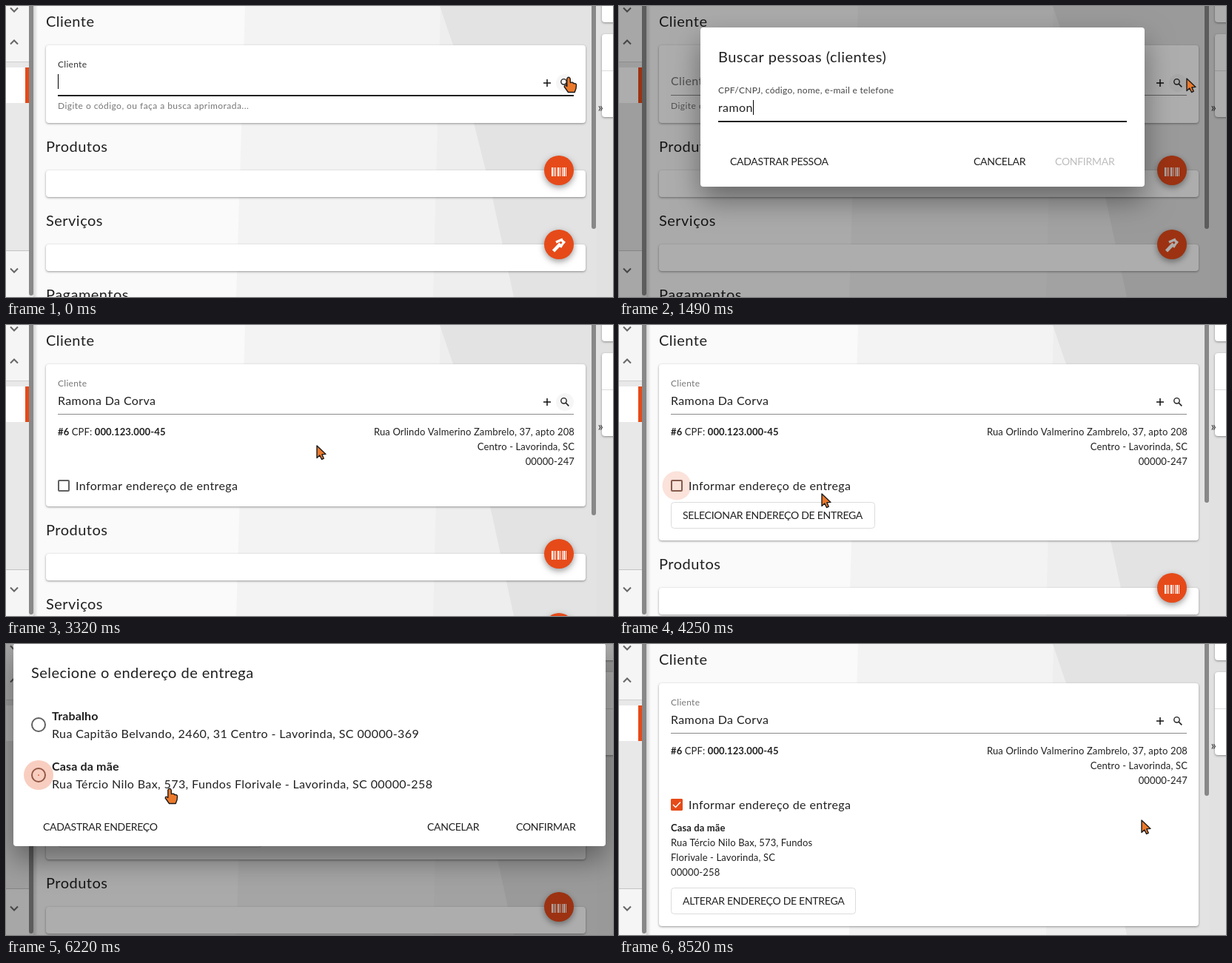
An HTML page with a canvas for the animation above (9860 ms loop, 820 by 393 pixels).

```html
<!DOCTYPE html>
<html lang="pt-BR">
<head>
<meta charset="utf-8">
<title>Endereço de entrega</title>
<style>
  html, body { margin: 0; width: 100%; height: 100%; overflow: hidden; background: #fafafa; }
  canvas { display: block; }
</style>
</head>
<body>
<canvas id="stage" width="820" height="393"></canvas>
<script>
const ctx = document.getElementById('stage').getContext('2d');
const LOOP = 9860;
const INK = '#212121', GREY = '#777', ORANGE = '#e64a19';
const CLIENT = 'Ramona Da Corva', TYPED = 'ramon';
const CITY = 'Lavorinda, SC';
const CENTER = [410, 136.5];

// Moments of the story, in ms
const SEARCH = { open: 240, close: 2940 };
const ADDRESS = { open: 4330, close: 8240 };
const INFO = 3300, CHECK = 4150, DELIVERED = 8280;
const KEYS = [800, 1040, 1140, 1300, 1490];
const LIST = { open: 1900, pick: 2740 };
const PICKS = [[6200, 1], [7240, 0], [7650, 1]];

const PATH = [
  [0, 760, 96], [300, 760, 96], [420, 767, 98], [1720, 767, 98], [2400, 420, 163],
  [3620, 420, 163], [4000, 284, 214], [4250, 274, 228], [4650, 274, 228],
  [4900, 70, 130], [5250, 560, 345], [5400, 785, 345], [5560, 768, 272],
  [5970, 768, 272], [6190, 221, 195], [6260, 221, 195], [6750, 764, 258],
  [6910, 764, 258], [7090, 436, 125], [7240, 436, 125], [7560, 424, 165],
  [7680, 424, 165], [8210, 700, 237], [8240, 700, 237], [8480, 706, 238]
];

const clamp = v => Math.max(0, Math.min(1, v));
const prog = (t, a, b) => clamp((t - a) / (b - a));
const smooth = p => p * p * (3 - 2 * p);
const ease = (t, a, b) => smooth(prog(t, a, b));
const lerp = (a, b, p) => a + (b - a) * p;
const mix = p => `rgb(${lerp(97, 230, p)},${lerp(97, 74, p)},${lerp(97, 25, p)})`;

function rect(x, y, w, h, color) {
  ctx.fillStyle = color;
  ctx.fillRect(x, y, w, h);
}

function round(x, y, w, h, r, color) {
  ctx.beginPath();
  ctx.roundRect(x, y, w, h, r);
  ctx.fillStyle = color;
  ctx.fill();
}

function circle(x, y, r, color) {
  ctx.beginPath();
  ctx.arc(x, y, r, 0, 7);
  ctx.fillStyle = color;
  ctx.fill();
}

function poly(points, color) {
  ctx.beginPath();
  points.forEach(([x, y]) => ctx.lineTo(x, y));
  ctx.closePath();
  ctx.fillStyle = color;
  ctx.fill();
}

function line(points, color, width) {
  ctx.beginPath();
  points.forEach(([x, y]) => ctx.lineTo(x, y));
  ctx.strokeStyle = color;
  ctx.lineWidth = width;
  ctx.stroke();
}

function shadowed(blur, dy, alpha, draw) {
  ctx.save();
  ctx.shadowColor = `rgba(0,0,0,${alpha})`;
  ctx.shadowBlur = blur;
  ctx.shadowOffsetY = dy;
  draw();
  ctx.restore();
}

function text(s, x, y, size, { color = INK, bold = false, align = 'left', space = 0.024 } = {}) {
  ctx.font = `${bold ? 'bold ' : ''}${size}px Lato, sans-serif`;
  ctx.letterSpacing = space * size + 'px';
  ctx.textAlign = align;
  ctx.fillStyle = color;
  ctx.fillText(s, x, y);
  return ctx.measureText(s).width;
}

const caps = (s, x, y, color) => text(s, x, y, 14, { color, space: -0.02 });
const small = (s, x, y, options) => text(s, x, y, 13, { space: 0.01, ...options });

function floatLabel(s, x, p, color) {
  text(s, x, lerp(107, 83, p), lerp(16, 12, p), { color });
}

function card(y, h) {
  shadowed(3, 1, 0.4, () => round(54, y, 729, h, 4, '#fff'));
}

function outlined(x, y, w, h, label) {
  ctx.beginPath();
  ctx.roundRect(x + .5, y + .5, w - 1, h - 1, 4);
  ctx.strokeStyle = '#dcdcdc';
  ctx.lineWidth = 1;
  ctx.stroke();
  caps(label, x + 16, y + 23);
}

function chevron(x, y, dir) {
  line([[x - 5, y - 2.5 * dir], [x, y + 2.5 * dir], [x + 5, y - 2.5 * dir]], '#666', 2);
}

function backdrop() {
  rect(0, 0, 820, 393, '#fafafa');
  poly([[323, 0], [800, 0], [800, 393], [311, 393]], '#f3f3f3');
  poly([[587, 0], [800, 0], [800, 393], [577, 393]], '#eeeeee');
  poly([[586, 0], [604, 53], [632, 158], [657, 258], [686, 393], [800, 393], [800, 0]], '#e3e3e3');
}

function sidebar() {
  const g = ctx.createLinearGradient(37, 0, 43, 0);
  g.addColorStop(0, 'rgba(0,0,0,.16)');
  g.addColorStop(1, 'rgba(0,0,0,0)');
  rect(37, 0, 6, 393, g);
  rect(0, 0, 37, 393, '#e8e8e8');
  rect(0, 0, 31, 75, '#f5f5f5');
  rect(0, 75, 31, 1, '#cfcfcf');
  rect(0, 83, 31, 48, '#fff');
  rect(26, 83, 5, 48, ORANGE);
  rect(0, 330, 31, 63, '#f5f5f5');
  rect(0, 330, 31, 1, '#c4c4c4');
  chevron(11, 5, 1);
  chevron(11, 49, -1);
  chevron(11, 357, 1);
  round(31, -8, 6, 399, 3, '#888');
}

function rightPanel(thumb) {
  rect(798, 0, 22, 393, '#e1e1e1');
  round(791, -8, 6, thumb + 8, 3, '#888');
  shadowed(3, 1, 0.4, () => {
    round(805, -10, 30, 32, 4, '#fff');
    round(805, 38, 30, 112, 4, '#fff');
  });
  rect(805, 87, 15, 1, '#ddd');
  text('»', 799.5, 143, 17, { color: '#333', space: 0 });
}

function fab(y, icon) {
  shadowed(8, 3, 0.4, () => circle(747, y, 20, ORANGE));
  icon(y);
}

function barsIcon(y) {
  [0, 3, 5, 8, 11, 14, 16, 19].forEach((x, i) => rect(737 + x, y - 4, i % 3 ? 1 : 2, 12, '#fff'));
}

function toolIcon(y) {
  line([[739.5, y + 9], [749, y - 1]], '#fff', 4.5);
  line([[743, y - 3], [752, y - 7]], '#fff', 3.5);
  line([[749, y + 4], [754, y - 4]], '#fff', 3);
  line([[750, y - 6], [755, y - 2]], '#fff', 3);
}

function section(title, top, icon) {
  text(title, 54, top - 25, 20);
  card(top, 36);
  if (icon) fab(top, icon);
}

function checkbox(t) {
  const color = mix(prog(t, 4220, 4330)), fill = t >= DELIVERED ? 1 : prog(t, 4260, 4340);
  if (t >= CHECK && t < DELIVERED)
    circle(78, 217, lerp(8, 19.5, prog(t, CHECK, CHECK + 90)), 'rgba(230,74,25,.16)');
  ctx.beginPath();
  ctx.roundRect(71, 210, 14, 14, 1);
  ctx.strokeStyle = color;
  ctx.lineWidth = 2;
  ctx.stroke();
  if (fill) {
    ctx.globalAlpha = fill;
    round(70, 209, 16, 16, 2, ORANGE);
    line([[73, 217], [76.5, 220.5], [83, 213.5]], '#fff', 1.5);
    ctx.globalAlpha = 1;
  }
  text('Informar endereço de entrega', 94, 223, 16);
}

function clientInfo(t) {
  const w = small('#6', 70, 149, { bold: true });
  const w2 = small(' CPF: ', 70 + w, 149);
  small('000.123.000-45', 70 + w + w2, 149, { bold: true });
  ['Rua Orlindo Valmerino Zambrelo, 37, apto 208', 'Centro - ' + CITY, '00000-247']
    .forEach((s, i) => small(s, 768, 149 + 20 * i, { align: 'right' }));
  checkbox(t);
  if (t >= DELIVERED) {
    small('Casa da mãe', 70, 253, { bold: true });
    ['Rua Tércio Nilo Bax, 573, Fundos', 'Florivale - ' + CITY, '00000-258']
      .forEach((s, i) => small(s, 70, 273 + 20 * i));
    outlined(70, 329, 250, 36, 'ALTERAR ENDEREÇO DE ENTREGA');
  } else if (t >= CHECK) {
    outlined(70, 239, 276, 36, 'SELECIONAR ENDEREÇO DE ENTREGA');
  }
}

function clientCard(t, bottom) {
  const chosen = t >= SEARCH.close, active = t < 435;
  const p = chosen ? ease(t, SEARCH.close, SEARCH.close + 150) : 1 - ease(t, 435, 585);
  card(53, bottom - 53);
  floatLabel('Cliente', 70, p, active ? '#333' : GREY);
  if (chosen) text(CLIENT, 70, 108, 16);
  if (t < 60) rect(70, 92, 1, 20, '#000');
  rect(70, 120, 697, active ? 2 : 1, active ? INK : '#8a8a8a');
  line([[726, 104], [736, 104]], '#111', 1.5);
  line([[731, 99], [731, 109]], '#111', 1.5);
  if (t < CHECK) circle(755, 104, 12, '#f6f6f6');
  ctx.beginPath();
  ctx.arc(753.5, 102.3, 3.7, 0, 7);
  ctx.strokeStyle = '#222';
  ctx.lineWidth = 1.4;
  ctx.stroke();
  line([[756, 105], [760.3, 109.3]], '#222', 1.7);
  if (t >= INFO) clientInfo(t);
  else text('Digite o código, ou faça a busca aprimorada...', 70, 139, 12, { color: GREY, space: 0.038 });
}

function page(t) {
  const [bottom, thumb] = t >= DELIVERED ? [381, 205] : t >= CHECK ? [291, 240]
    : t >= INFO ? [245, 257] : [158, 301];
  backdrop();
  text('Cliente', 54, 28, 20);
  clientCard(t, bottom);
  section('Produtos', bottom + 64, barsIcon);
  section('Serviços', bottom + 164, toolIcon);
  section('Pagamentos', bottom + 264);
  sidebar();
  rightPanel(thumb);
}

function dialog(t, { open, close }, x, y, w, h, content) {
  if (t < open || t > close + 90) return;
  const leave = 1 - prog(t, close, close + 90);
  rect(0, 0, 820, 393, `rgba(0,0,0,${0.32 * prog(t, open, open + 150) * leave})`);
  const p = 1 - (1 - prog(t, open, open + 150)) ** 3, s = lerp(0.8, 1, p);
  ctx.save();
  ctx.globalAlpha = prog(t, open, open + 75) * leave;
  ctx.translate(...CENTER);
  ctx.scale(s, s);
  ctx.translate(-CENTER[0], -CENTER[1]);
  shadowed(38, 18, 0.4, () => round(x, y, w, h, 4, '#fff'));
  content(t);
  ctx.restore();
}

function squiggle(x, end, y) {
  const points = [];
  for (let i = 0; x + i * 2 <= end; i++) points.push([x + i * 2, y + (i % 2 ? 1 : -1) * 0.9]);
  line(points, '#d33', 1);
}

function suggestions(t) {
  if (t < LIST.open || t > LIST.pick + 100) return;
  const [x, y] = cursorAt(t);
  const hover = y > 154 && x < 686;
  ctx.save();
  ctx.globalAlpha = prog(t, LIST.open, LIST.open + 120) * (1 - prog(t, LIST.pick, LIST.pick + 100));
  shadowed(7, 3, 0.4, () => round(134, 156, 552, 48, [0, 0, 4, 4], hover ? '#f2f2f2' : '#fff'));
  circle(167, 178, 4.2, '#c4c4c4');
  round(159, 184, 16, 6.5, [6, 6, 0, 0], '#c4c4c4');
  text(CLIENT, 185, 186, 16);
  ctx.restore();
}

function searchContent(t) {
  const p = ease(t, 435, 585), half = 276 * ease(t, 380, 560);
  text('Buscar pessoas (clientes)', 134, 76, 20);
  text('CPF/CNPJ, código, nome, e-mail e telefone', 134, lerp(142, 118, p), lerp(16, 12, p),
    { color: p < 1 ? GREY : '#444' });
  rect(134, 155, 552, 1, '#8a8a8a');
  rect(410 - half, 155, half * 2, 2, INK);
  const picked = t >= LIST.pick;
  const typed = picked ? CLIENT : TYPED.slice(0, KEYS.filter(k => t >= k).length);
  const end = 134 + (typed ? text(typed, 134, 143, 16) : 0);
  if (t >= 1720 && !picked) squiggle(134, end, 146);
  if (t >= 380) rect(Math.round(end), 127, 1, 20, '#000');
  caps('CADASTRAR PESSOA', 150, 215);
  caps('CANCELAR', 479, 215);
  caps('CONFIRMAR', 589, 215, picked ? INK : '#bdbdbd');
  suggestions(t);
}

function radio(t, y, start) {
  const p = start === null ? 0 : prog(t, start, start + 120);
  if (start !== null)
    circle(44, y, 20, `rgba(230,74,25,${lerp(0.27, 0.12, prog(t, start + 100, start + 350))})`);
  ctx.beginPath();
  ctx.arc(44, y, 9, 0, 7);
  ctx.strokeStyle = mix(start === null ? 0 : clamp(p + 0.2));
  ctx.lineWidth = 2;
  ctx.stroke();
  if (p) circle(44, y, 5 * p, ORANGE);
}

function addressContent(t) {
  const [start, row] = PICKS.filter(([at]) => t >= at).pop() || [null, -1];
  text('Selecione o endereço de entrega', 34, 46, 20);
  [['Trabalho', 'Rua Capitão Belvando, 2460, 31 Centro - ' + CITY + ' 00000-369'],
   ['Casa da mãe', 'Rua Tércio Nilo Bax, 573, Fundos Florivale - ' + CITY + ' 00000-258']]
    .forEach(([name, address], i) => {
      const y = 109 + 68 * i;
      radio(t, y, i === row ? start : null);
      text(name, 62, y - 6, 16, { bold: true, space: 0.01 });
      text(address, 62, y + 18, 16);
    });
  caps('CADASTRAR ENDEREÇO', 50, 252);
  caps('CANCELAR', 569, 252);
  caps('CONFIRMAR', 689, 252);
}

function cursorAt(t) {
  const next = PATH.findIndex(k => k[0] > t);
  if (next < 0) return PATH[PATH.length - 1].slice(1);
  const [t0, x0, y0] = PATH[next - 1], [t1, x1, y1] = PATH[next];
  const p = ease(t, t0, t1);
  return [lerp(x0, x1, p), lerp(y0, y1, p)];
}

function isHand(t, x, y) {
  const inside = (l, top, r, b) => x >= l && x <= r && y >= top && y <= b;
  if (t < 300) return true;
  if (t >= LIST.open && t < LIST.pick + 60) return inside(134, 156, 686, 204);
  if (t >= INFO && t < ADDRESS.open) return inside(62, 200, 316, 226);
  if (t >= ADDRESS.open && t < ADDRESS.close + 60)
    return inside(24, 88, 590, 200) || inside(553, 229, 786, 265);
  return false;
}

function cursor(t) {
  const [x, y] = cursorAt(t);
  ctx.save();
  ctx.translate(x, y);
  ctx.beginPath();
  if (isHand(t, x, y)) {
    ctx.moveTo(-2.2, 2);
    ctx.quadraticCurveTo(0, -1.5, 2.2, 2);
    ctx.lineTo(2.4, 7.5);
    ctx.quadraticCurveTo(6, 6.5, 6.5, 8.5);
    ctx.quadraticCurveTo(10.5, 8, 10.5, 11);
    ctx.lineTo(10, 15.5);
    ctx.lineTo(8.2, 20.5);
    ctx.lineTo(-0.5, 20.5);
    ctx.lineTo(-5.8, 13);
    ctx.quadraticCurveTo(-5.5, 9.5, -2.2, 12.5);
  } else {
    [[0, 0], [0, 16.5], [3.8, 13], [6.5, 18.5], [9.3, 17.2], [6.8, 11.8], [12, 11.4]]
      .forEach(([px, py]) => ctx.lineTo(px, py));
  }
  ctx.closePath();
  ctx.lineJoin = 'round';
  ctx.lineWidth = 1.4;
  ctx.fillStyle = '#ec7a2c';
  ctx.strokeStyle = '#1c1c1c';
  ctx.fill();
  ctx.stroke();
  ctx.restore();
}

const begin = performance.now();
function frame() {
  const t = (performance.now() - begin) % LOOP;
  page(t);
  dialog(t, SEARCH, 110, 29, 600, 215, searchContent);
  dialog(t, ADDRESS, 10, -1, 800, 274, addressContent);
  cursor(t);
  requestAnimationFrame(frame);
}
frame();
</script>
</body>
</html>
```
